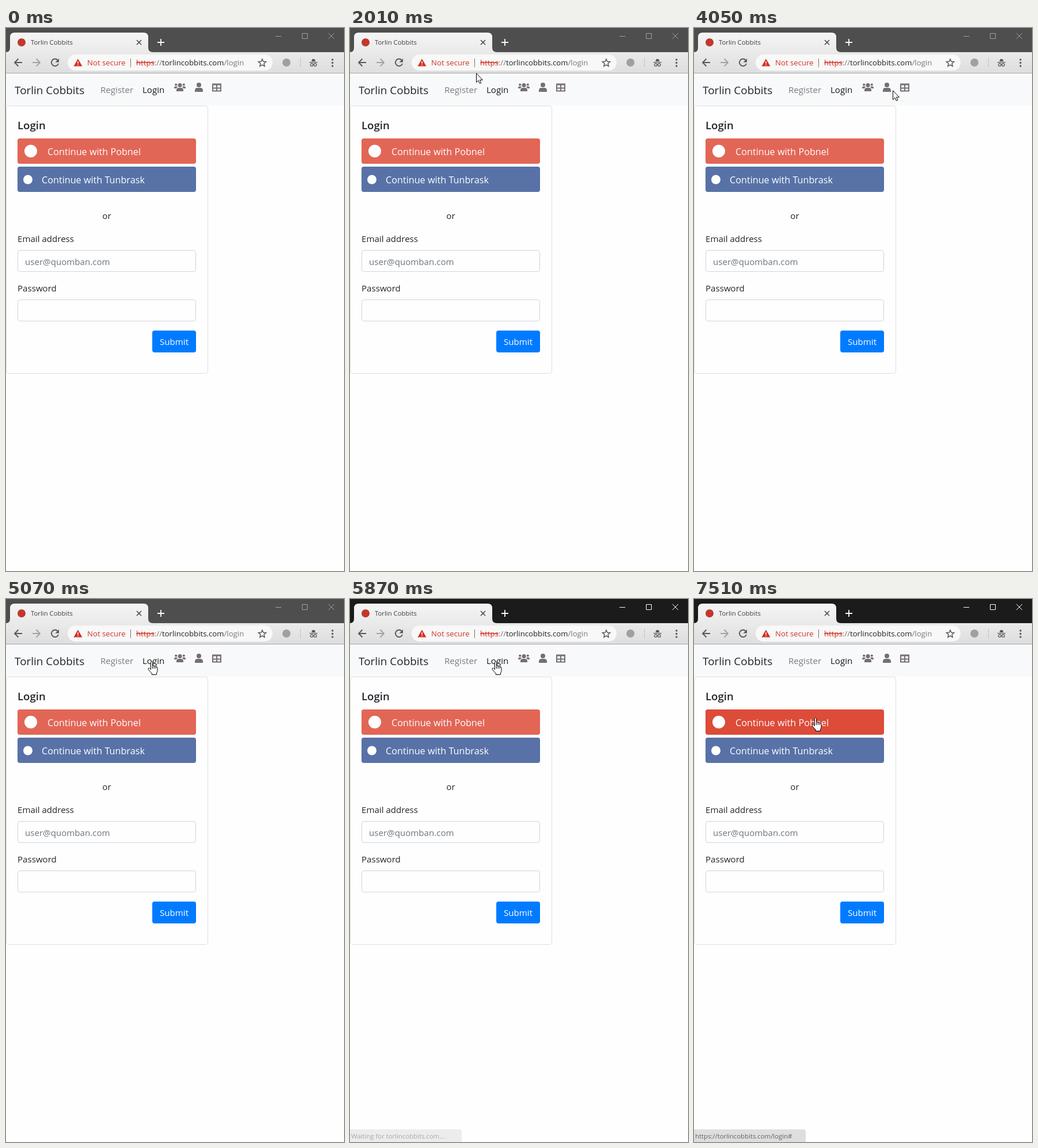
Recreate the animation shown at these times as an HTML page. Size 587 px wide and 944 px high, loop 8 s.

```html
<!DOCTYPE html>
<html lang="en">
<head>
<meta charset="utf-8">
<title>Login page</title>
<style>
html, body { margin: 0; width: 100%; height: 100%; overflow: hidden; background: #fefefe }
svg { display: block; font: 15.1px "Open Sans", "Noto Sans", sans-serif; fill: #212529 }
.line { fill: none; stroke: currentColor }
.tab { font-size: 11.35px; fill: #3c4043 }
.url { font-size: 13.2px }
.button { font-size: 16.2px; fill: #fff }
.cursor { display: none }
</style>
</head>
<body>
<svg width="587" height="944" viewBox="0 0 587 944">
  <defs>
    <linearGradient id="chrome" gradientUnits="userSpaceOnUse" x1="0" y1="8" x2="0" y2="78">
      <stop stop-color="#f5f5f5"/><stop offset="1" stop-color="#dedede"/>
    </linearGradient>
  </defs>

  <!-- Title bar and tab -->
  <rect id="titleBar" width="587" height="42"/>
  <path fill="url(#chrome)" d="M0 42Q7 42 7 34V16Q7 8 15 8H239Q247 8 247 16V34Q247 42 255 42H587V78H0Z"/>
  <circle cx="27" cy="25" r="7" fill="#c0392b"/>
  <text class="tab" x="43" y="29">Torlin Cobbits</text>
  <path class="line" color="#45484b" stroke-width="1.6" d="M227 21l8 8m0-8l-8 8"/>
  <path class="line" color="#fff" stroke-width="1.8" d="M263 25h12m-6-6v12"/>
  <path id="controls" class="line" d="M468 14.5h10M514.5 9.5h9v9h-9zM560 9l10 10m0-10l-10 10"/>

  <!-- Toolbar -->
  <rect y="78" width="587" height="1" fill="#a6a6a6"/>
  <rect id="omnibox" x="107" y="46" width="356" height="28" rx="14"/>
  <g class="line" stroke-width="1.9">
    <path color="#55585c" d="M28 60H15m6.5-6.5L15 60l6.5 6.5"/>
    <path color="#a2a2a2" d="M46 60h13m-6.5-6.5L59 60l-6.5 6.5"/>
    <path color="#55585c" d="M89.5 55.5A6.2 6.2 0 1 0 91 62"/>
  </g>
  <path fill="#55585c" d="M92 53v6.5h-6.5z"/>
  <path fill="#d23226" d="M125 53.5L132.5 66.5H117.500z"/>
  <path class="line" color="#fff" stroke-width="1.5" d="M125 58v4m0 1.200v1.500"/>
  <g class="url">
    <text x="141" y="65" fill="#d23226">Not secure</text>
    <text x="226" y="65" fill="#777"><tspan fill="#d23226" text-decoration="line-through">https</tspan>://<tspan fill="#202124">torlincobbits.com</tspan>/login</text>
  </g>
  <path class="line" color="#777" d="M216.500 53v15"/>
  <path class="line" color="#55585c" stroke-width="1.5" d="M445 54l1.900 4.300 4.700.4-3.500 3.100 1 4.600-4.100-2.400-4.100 2.400 1-4.600-3.500-3.100 4.700-.4z"/>
  <circle cx="487" cy="60" r="7" fill="#a0a0a0"/>
  <path class="line" color="#c2c2c2" d="M511.500 52v16"/>
  <g fill="#55585c">
    <path d="M530.500 58l1.500-4h4l1.500 4zM527 59h14v1.300h-14z"/>
    <circle cx="567" cy="55" r="1.700"/><circle cx="567" cy="60.500" r="1.700"/><circle cx="567" cy="66" r="1.700"/>
  </g>
  <g class="line" color="#55585c" stroke-width="1.200">
    <circle cx="531" cy="64" r="2.300"/><circle cx="537" cy="64" r="2.300"/><path d="M533 63.500h2"/>
  </g>

  <!-- Navigation -->
  <rect y="79" width="587" height="56" fill="#f8f9fa"/>
  <text x="15" y="115" font-size="18.9">Torlin Cobbits</text>
  <text x="164" y="113" fill="#7c7c7d">Register</text>
  <text x="237" y="113" fill="#171819">Login</text>
  <g fill="#756f75">
    <circle cx="302" cy="99.500" r="3.500"/>
    <circle cx="295.200" cy="98.500" r="2.100"/><circle cx="308.800" cy="98.500" r="2.100"/>
    <path d="M296 110v-2q0-4 4-4h4q4 0 4 4v2zM292 105v-1q0-2.500 2.500-2.500h2l1.500 1-2.500 2.500zM312 105v-1q0-2.500-2.500-2.500h-2l-1.500 1 2.500 2.500z"/>
    <circle cx="335" cy="99" r="4"/>
    <path d="M328 111v-2q0-5 4.500-5h5q4.500 0 4.500 5v2z"/>
  </g>
  <path class="line" color="#756f75" stroke-width="2" d="M359 97.500h14v12h-14zM358 98.500h16M359 104.500h14M366 98v12"/>

  <!-- Login card -->
  <rect class="line" color="#dfdfdf" x=".5" y="135.500" width="350" height="465" rx="4"/>
  <text x="20" y="176" font-size="18.6" font-weight="600">Login</text>
  <rect id="firstButton" x="20" y="192" width="310" height="44" rx="4"/>
  <rect x="20" y="241" width="310" height="44" rx="4" fill="#5872a7"/>
  <g class="button">
    <circle cx="43" cy="214" r="11"/>
    <text x="72" y="221">Continue with Pobnel</text>
    <circle cx="38" cy="263.500" r="8"/>
    <text x="62" y="270">Continue with Tunbrask</text>
  </g>
  <text x="175" y="332" text-anchor="middle">or</text>
  <text x="20" y="372">Email address</text>
  <text x="20" y="458">Password</text>
  <g class="line" color="#ced4da">
    <rect x="20.500" y="386.500" width="309" height="37" rx="4"/>
    <rect x="20.500" y="472.500" width="309" height="37" rx="4"/>
  </g>
  <text x="33" y="412" fill="#6c757d">user@quomban.com</text>
  <rect x="254" y="526" width="76" height="38" rx="4" fill="#007bff"/>
  <text x="267" y="551" fill="#fff">Submit</text>

  <g id="status">
    <path fill="#dedede" d="M0 922H190Q194 922 194 926V944H0Z"/>
    <text id="statusText" class="tab" x="2" y="938" style="fill:#5f6368"></text>
  </g>

  <!-- Pointers -->
  <path id="arrow" class="cursor" fill="#fff" stroke="#000" d="M.5 .8V16.500L4 13.200 6.400 18.500 8.800 17.400 6.500 12.300H11.300Z"/>
  <g id="beam" class="cursor line" color="#000">
    <path d="M-3 -7.500H-1L0 -6.500 1 -7.500H3M0 -6.500V6.500M-3 7.500H-1L0 6.500 1 7.500H3"/>
  </g>
  <path id="hand" class="cursor" fill="#fff" stroke="#000" stroke-linejoin="round" d="M5.500 14.500V2.300C5.500 0 8.500 0 8.500 2.300V8.500C9 7 11.300 7.300 11.300 9.200 12 7.900 14.200 8.300 14.200 10.200 15 9.200 17 9.700 17 11.800V16.500Q17 19 15.300 21V23.500H7.300V21Q3.500 18 1.200 14.300C.2 12.300 2.500 11.300 3.700 12.700ZM8.500 8.500V13M11.300 9.200V13M14.200 10.200V13"/>
</svg>
<script>
const LOOP = 8000;
const el = id => document.getElementById(id);
const ids = ['titleBar', 'controls', 'omnibox', 'firstButton', 'status', 'statusText'];
const [titleBar, controls, omnibox, firstButton, status, statusText] = ids.map(el);
const cursors = ['arrow', 'beam', 'hand'].map(el);

// Pointer samples: start time, shape, x, y
const path = [
  [0, 'none', 0, 0],
  [1190, 'arrow', 437, 42], [1390, 'beam', 372, 58], [1600, 'beam', 306, 65],
  [1800, 'arrow', 250, 74], [2010, 'arrow', 219, 78], [2210, 'beam', 249, 71],
  [2410, 'beam', 280, 66], [2610, 'beam', 302, 63], [2820, 'beam', 324, 62],
  [3030, 'beam', 343, 62], [3230, 'beam', 380, 61], [3430, 'beam', 418, 61],
  [3850, 'beam', 396, 67], [4050, 'arrow', 345, 108], [4260, 'arrow', 300, 150],
  [4460, 'arrow', 272, 172], [4670, 'arrow', 258, 138], [4870, 'hand', 246, 108],
  [6890, 'arrow', 230, 148], [7090, 'arrow', 213, 185],
  [7300, 'hand', 204, 200], [7510, 'hand', 204, 206]
];

// Status bubble: start time, text, opacity
const messages = [
  [0, '', 0],
  [5270, 'https://torlincobbits.com/login', 1],
  [5480, 'Waiting for torlincobbits.com...', 1],
  [5870, 'Waiting for torlincobbits.com...', .55],
  [6100, '', 0],
  [7510, 'https://torlincobbits.com/login#', 1]
];

const at = (list, t) => list.findLast(item => item[0] <= t);

function draw(now) {
  const t = now % LOOP;
  const [, shape, x, y] = at(path, t);
  const [, message, opacity] = at(messages, t);
  const active = t >= 5270;

  for (const c of cursors) {
    c.style.display = c.id === shape ? 'inline' : 'none';
    c.setAttribute('transform', `translate(${x + (shape === 'beam' ? .5 : 0)} ${y})`);
  }
  titleBar.style.fill = active ? '#1b1b1b' : '#4e4e4e';
  controls.style.color = active ? '#fff' : '#a0a0a0';
  omnibox.style.fill = shape === 'beam' ? '#ebebeb' : '#f8f8f8';
  firstButton.style.fill = t < 7300 ? '#e26656' : t < 7510 ? '#df5847' : '#dd4b39';
  status.style.opacity = opacity;
  statusText.textContent = message;
}

function tick() {
  draw(performance.now());
  requestAnimationFrame(tick);
}
tick();
</script>
</body>
</html>
```
